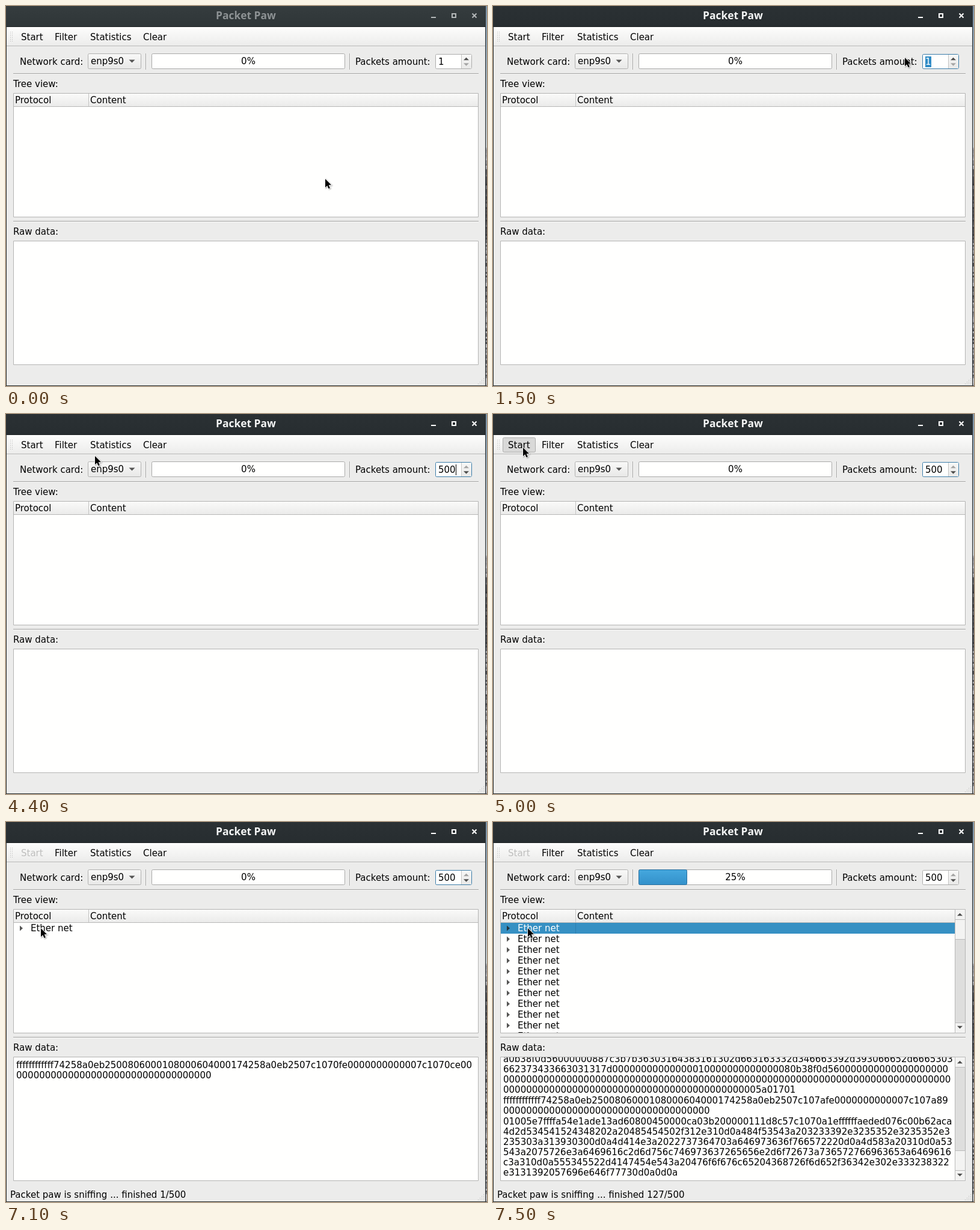
Write an HTML page with a canvas that moves like this. It is 800 px wide and 633 px high and loops after 8000 ms.

```html
<!DOCTYPE html>
<html lang="en">
<head>
<meta charset="utf-8">
<title>Packet Paw</title>
<style>
html, body { margin: 0; width: 100%; height: 100%; overflow: hidden; background: #ececeb; }
canvas { display: block; width: 800px; height: 633px; }
</style>
</head>
<body>
<canvas id="stage" width="800" height="633"></canvas>
<script>
const ctx = document.getElementById('stage').getContext('2d');
const LOOP = 8000;
const FONT = '15px "DejaVu Sans", sans-serif';
const BLUE = '#308cc6';

// Pointer stops: time, x, y
const POINTER = [
  [0, 531, 288], [300, 618, 224], [400, 698, 164],
  [600, 714, 136], [700, 732, 106], [800, 744, 90], [900, 747, 91],
  [1200, 738, 92], [1300, 718, 91], [1500, 685, 86], [2000, 683, 86],
  [3000, 610, 86], [3100, 440, 78], [3200, 322, 70], [3400, 186, 70],
  [3600, 120, 62], [3700, 50, 56], [3800, 62, 66], [3900, 112, 71], [4000, 148, 70],
  [4700, 48, 87], [4900, 49, 62], [5000, 50, 56],
  [6200, 122, 165], [6400, 116, 169], [6600, 101, 174], [6800, 82, 177],
  [7000, 66, 178], [7100, 58, 177]
];

const zeros = n => '0'.repeat(n);
const ARP = 'ffffffffffff74258a0eb2500806000108000604000174258a0eb250';
const FIRST_RAW = [ARP + '7c1070fe' + zeros(12) + '7c1070ce00', zeros(34)];
// Blocks of wrapped lines
const FULL_RAW = [
  ['a0b38f0d56000000887c3b7b36303164383161302d663163332d346663392d393066652d6665303',
   '662373433663031317d' + zeros(15) + '1' + zeros(14) + '80b38f0d56' + zeros(19),
   zeros(78),
   zeros(44) + '5a01701'],
  [ARP + '7c107afe' + zeros(12) + '7c107a89', zeros(36)],
  ['01005e7ffffa54e1ade13ad60800450000ca03b200000111d8c57c1070a1effffffaeded076c00b62aca',
   '4d2d534541524348202a20485454502f312e310d0a484f53543a203233392e3235352e3235352e3',
   '235303a313930300d0a4d414e3a2022737364703a646973636f766572220d0a4d583a20310d0a53',
   '543a2075726e3a6469616c2d6d756c746973637265656e2d6f72673a736572766963653a6469616',
   'c3a310d0a555345522d4147454e543a20476f6f676c65204368726f6d652f36342e302e333238322',
   'e3131392057696e646f77730d0a0d0a']
];

function rect(x, y, w, h, color) {
  ctx.fillStyle = color;
  ctx.fillRect(x, y, w, h);
}

function shade(y, h, top, bottom) {
  const g = ctx.createLinearGradient(0, y, 0, y + h);
  g.addColorStop(0, top);
  g.addColorStop(1, bottom);
  return g;
}

function box(x, y, w, h, fill, line, r = 0) {
  ctx.beginPath();
  ctx.roundRect(x + 0.5, y + 0.5, w - 1, h - 1, r);
  ctx.fillStyle = fill;
  ctx.fill();
  ctx.strokeStyle = line;
  ctx.lineWidth = 1;
  ctx.stroke();
}

function text(s, x, y, color = '#000', align = 'left', font = FONT) {
  ctx.font = font;
  ctx.textAlign = align;
  ctx.fillStyle = color;
  ctx.fillText(s, x, y);
}

function poly(points, color) {
  ctx.beginPath();
  points.forEach(([x, y]) => ctx.lineTo(x, y));
  ctx.closePath();
  ctx.fillStyle = color;
  ctx.fill();
}

// Vertical arrow head; dir is -1 for up, 1 for down
function arrow(x, y, dir, color, r = 4.5) {
  poly([[x - r, y - dir * r / 2], [x + r, y - dir * r / 2], [x, y + dir * r / 2]], color);
}

function clipped(x, y, w, h, draw) {
  ctx.save();
  ctx.beginPath();
  ctx.rect(x, y, w, h);
  ctx.clip();
  draw();
  ctx.restore();
}

function desktopEdge() {
  rect(798, 0, 2, 236, shade(0, 236, '#7b93a8', '#c3c9cb'));
  for (let y = 236; y < 633; y += 3) {
    const n = Math.abs(Math.sin(y * 12.9898) * 43758.5453) % 1;
    const base = y < 270 ? 120 : y < 390 ? 55 : 70;
    const v = Math.round(base + n * (y < 390 ? 60 : 120));
    rect(798, y, 2, 3, `rgb(${v},${v},${v + 4})`);
  }
}

function windowFrame(active) {
  rect(0, 0, 800, 633, '#ececeb');
  desktopEdge();
  rect(0, 0, 798, 35, active ? shade(0, 34, '#2b3134', '#272d30') : shade(0, 34, '#353c3e', '#2f3638'));
  rect(0, 34, 798, 1, '#1a1e20');
  rect(0, 34, 1, 599, '#252b2d');
  rect(797, 34, 1, 599, '#252b2d');
  rect(0, 632, 798, 1, '#252b2d');

  const ink = active ? '#f4f5f5' : '#8d9294';
  text('Packet Paw', 399, 22, ink, 'center', 'bold 17.4px "Noto Sans", sans-serif');
  const icon = active ? '#fff' : '#b3b7b8';
  rect(707, 18, 8, 2, icon);
  ctx.strokeStyle = icon;
  ctx.lineWidth = 2;
  ctx.strokeRect(742, 13, 6, 6);
  ctx.beginPath();
  ctx.moveTo(775.5, 12.5); ctx.lineTo(782.5, 19.5);
  ctx.moveTo(782.5, 12.5); ctx.lineTo(775.5, 19.5);
  ctx.stroke();
}

function toolbar(s) {
  rect(1, 35, 796, 31, shade(35, 31, '#fdfdfc', '#ececeb'));
  rect(1, 66, 796, 1, '#b9b9b8');
  for (let y = 43; y < 60; y += 3) {
    rect(7, y, 1, 1, '#b5b5b4');
    rect(10, y, 1, 1, '#b5b5b4');
  }
  if (s.button === 'hover') box(16, 39, 55, 25, shade(39, 25, '#fafafa', '#ebebea'), '#b5b5b4', 2);
  if (s.button === 'down') box(16, 39, 55, 25, '#d9d9d8', '#adadac', 2);
  text('Start', 25, 57, s.sniffing ? '#bebebd' : '#000');
  text('Filter', 81, 57);
  text('Statistics', 140, 57);
  text('Clear', 228, 57);
}

function progress(value) {
  box(242, 79, 322, 26, '#fffffe', '#a9a9a8', 2);
  if (value) {
    const w = Math.round(322 * value / 100);
    box(242, 79, w, 26, shade(79, 26, '#45a8de', '#3390ca'), '#2b6f9e', 2);
  }
  text(value + '%', 403, 97, '#000', 'center');
}

function spinBox(s) {
  box(714, 80, 61, 25, '#fffffe', s.focus ? '#3a7ca8' : '#adadac', 2);
  rect(758, 81, 16, 23, shade(81, 23, '#f8f8f7', '#e9e9e8'));
  rect(757, 81, 1, 23, '#c4c4c3');
  const full = s.amount === '500';
  arrow(765.5, 88, -1, full ? '#a5a5a4' : '#4d4d4c');
  arrow(765.5, 97.5, 1, s.amount === '1' ? '#a5a5a4' : '#4d4d4c');
  if (s.selected) rect(719, 84, 10, 18, BLUE);
  text(s.amount, 719, 98, s.selected ? '#fff' : '#000');
  if (s.caret) {
    ctx.font = FONT;
    rect(Math.round(719 + ctx.measureText(s.amount).width), 84, 1, 18, '#000');
  }
}

function options(s) {
  text('Network card:', 23, 98);
  box(136, 79, 89, 26, shade(79, 26, '#f9f9f8', '#e8e8e7'), '#b0b0af', 2);
  text('enp9s0', 141, 97);
  arrow(209.5, 92, 1, '#555554', 5);
  for (const x of [232, 571]) {
    rect(x, 79, 1, 27, '#a5a5a4');
    rect(x + 1, 79, 1, 27, '#fafaf9');
  }
  progress(s.percent);
  text('Packets amount:', 581, 98);
  spinBox(s);
  for (const y of [112, 358]) {
    rect(12, y, 774, 1, '#a3a3a2');
    rect(12, y + 1, 774, 1, '#f8f8f7');
  }
}

function scrollBar(y, h, thumbY, thumbH) {
  rect(768, y, 17, h, '#dededd');
  rect(768, y, 1, h, '#b8b8b7');
  const part = (py, ph) => box(768, py, 18, ph, '#f3f3f2', '#bababa');
  part(y - 1, 18);
  part(y + h - 17, 18);
  part(thumbY, thumbH);
  arrow(776.5, y + 8, -1, '#4d4d4c');
  arrow(776.5, y + h - 9, 1, '#4d4d4c');
}

function treeView(s) {
  text('Tree view:', 12, 135);
  box(12, 145, 774, 207, '#fffffe', '#b4b4b3');
  rect(13, 146, 772, 21, shade(146, 21, '#fafaf9', '#ebebea'));
  rect(13, 167, 772, 1, '#b8b8b7');
  rect(137, 146, 1, 21, '#c3c3c2');
  text('Protocol', 15, 162);
  text('Content', 140, 162);
  clipped(13, 168, 772, 183, () => {
    for (let i = 0; i < s.rows; i++) {
      const picked = s.picked && i === 0;
      const y = 168 + 18 * i;
      if (picked) {
        rect(13, y, 755, 18, '#3690c3');
        rect(137, y, 1, 18, '#2d7fb0');
      }
      poly([[23, y + 4.5], [28, y + 9], [23, y + 13.5]], picked ? '#26343c' : '#555554');
      text('Ether net', 41, y + 14, picked ? '#fff' : '#000');
    }
  });
  if (s.filled) scrollBar(146, 205, 162, 34);
}

function rawData(s) {
  text('Raw data:', 12, 381);
  box(12, 391, 774, 207, '#fffffe', '#b4b4b3');
  clipped(13, 392, 772, 205, () => {
    if (s.filled) {
      let y = 400;
      for (const block of FULL_RAW) {
        block.forEach((line, i) => text(line, 17, y + 17 * i));
        y += 17 * block.length + 1;
      }
    } else if (s.rows) {
      FIRST_RAW.forEach((line, i) => text(line, 17, 410 + 17 * i));
    }
  });
  if (s.filled) scrollBar(392, 205, 547, 34);
}

function statusBar(s) {
  if (s.rows) text(`Packet paw is sniffing ... finished ${s.filled ? 127 : 1}/500`, 7, 626);
  for (let row = 0; row < 4; row++) {
    for (let col = 3 - row; col < 4; col++) rect(785 + 3 * col, 620 + 3 * row, 1, 1, '#b5b5b4');
  }
}

function pointer(t) {
  const [, x, y] = POINTER.findLast(p => p[0] <= t);
  ctx.save();
  ctx.translate(x, y);
  const overField = x > 714 && x < 757 && y > 81 && y < 104;
  ctx.beginPath();
  if (overField) {
    ctx.moveTo(-3, -8.5); ctx.lineTo(4, -8.5);
    ctx.moveTo(0.5, -8.5); ctx.lineTo(0.5, 8.5);
    ctx.moveTo(-3, 8.5); ctx.lineTo(4, 8.5);
    ctx.strokeStyle = '#fff';
    ctx.lineWidth = 3;
    ctx.stroke();
    ctx.strokeStyle = '#000';
    ctx.lineWidth = 1;
    ctx.stroke();
  } else {
    const tip = [[0, 0], [0, 14.2], [3.3, 11.2], [5.5, 16.2], [7.9, 15.2], [5.7, 10.3], [10, 10]];
    tip.forEach(p => ctx.lineTo(...p));
    ctx.closePath();
    ctx.shadowColor = 'rgba(0,0,0,.35)';
    ctx.shadowBlur = 2;
    ctx.shadowOffsetX = ctx.shadowOffsetY = 1;
    ctx.strokeStyle = '#fff';
    ctx.lineWidth = 1.6;
    ctx.stroke();
    ctx.shadowColor = 'transparent';
    poly(tip, '#000');
  }
  ctx.restore();
}

function stateAt(t) {
  const within = (a, b) => t >= a && t < b;
  const filled = t >= 7200;
  const picked = t >= 7500;
  const blinkOn = t < 3000 ? t >= 2100 : Math.floor((t - 2900) / 500) % 2 === 1;
  return {
    active: t >= 1100,
    focus: t >= 1100 && !picked,
    selected: within(1300, 2100),
    amount: t < 2100 ? '1' : t < 2400 ? '5' : t < 2500 ? '50' : '500',
    caret: blinkOn && !picked,
    button: within(5000, 5100) ? 'down' : within(3600, 3800) || within(4900, 5000) ? 'hover' : '',
    sniffing: t >= 5100,
    rows: filled ? 11 : t >= 6200 ? 1 : 0,
    percent: filled ? 25 : 0,
    filled,
    picked
  };
}

function draw(now) {
  const t = Math.floor((now % LOOP) / 100) * 100;
  const s = stateAt(t);
  windowFrame(s.active);
  toolbar(s);
  options(s);
  treeView(s);
  rawData(s);
  statusBar(s);
  pointer(t);
}

const start = performance.now();
function tick() {
  draw(performance.now() - start);
  requestAnimationFrame(tick);
}
tick();
</script>
</body>
</html>
```
